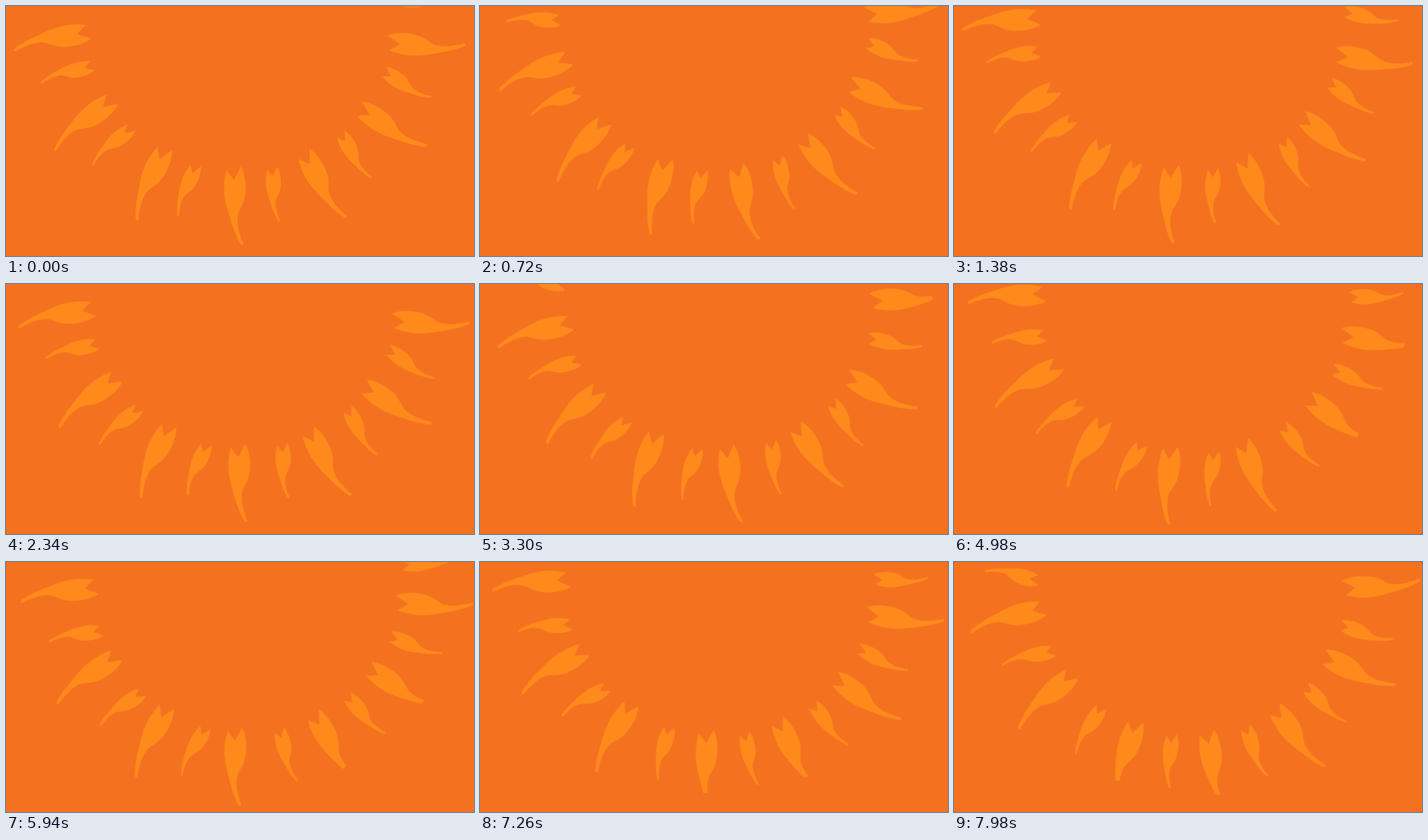
Write an HTML page that moves like this. It is 540 px wide and 289 px high and loops after 8 s.

```html
<!DOCTYPE html>
<html lang="en">
<head>
<meta charset="utf-8">
<title>Turning sun</title>
<style>
  html, body { margin: 0; height: 100%; overflow: hidden; background: #f47120; }
  svg { display: block; width: 100vw; height: 100vh; }
  #sun {
    fill: #fe8a1c;
    transform-origin: 272.5px 18px;
    animation: turn 8s infinite;
  }
  /* 255 steps of 60 ms make a full turn; the loop shows 133 of them */
  @keyframes turn {
    0% { transform: rotate(0deg); animation-timing-function: steps(133, end); }
    99.75%, 100% { transform: rotate(187.765deg); }
  }
</style>
</head>
<body>
<svg viewBox="0 0 540 289">
  <defs>
    <path id="flame" d="M-4 -8C4 -13 16 -15 26 -14.5C42 -14 46 -6 56 -6.5C66 -6 76 -10 85 -14Q88 -13.5 85.5 -10.5C74 -4 66 -1 54 3C40 8 24 13.5 1 8.5L12 -.8Z"/>
    <clipPath id="crop"><rect x="-100" y="-226" width="800" height="800"/></clipPath>
  </defs>
  <g id="sun">
    <g clip-path="url(#crop)">
      <g id="ring" transform="translate(269.1 13.1)"></g>
    </g>
  </g>
</svg>
<script>
  const COUNT = 13;
  const ring = document.getElementById('ring');

  function addFlame(angle, radius, tilt, scale) {
    const flame = document.createElementNS('http://www.w3.org/2000/svg', 'use');
    flame.setAttribute('href', '#flame');
    flame.setAttribute('transform',
      `rotate(${angle}) translate(${radius} 0) rotate(${tilt}) scale(${scale})`);
    ring.append(flame);
  }

  // Counter-clockwise from the seam, where the large flames leave a wider gap
  for (let i = 0; i < COUNT; i++) {
    const sway = 1.5 * Math.cos(2 * Math.PI * (i - 6) / 9);
    addFlame(-75.8 - 27.45 * i, 176, 0, 1);
    addFlame(-61 - 360 / COUNT * i + sway, 179.5, 1 + 1.5 * i, .7);
  }
</script>
</body>
</html>
```
